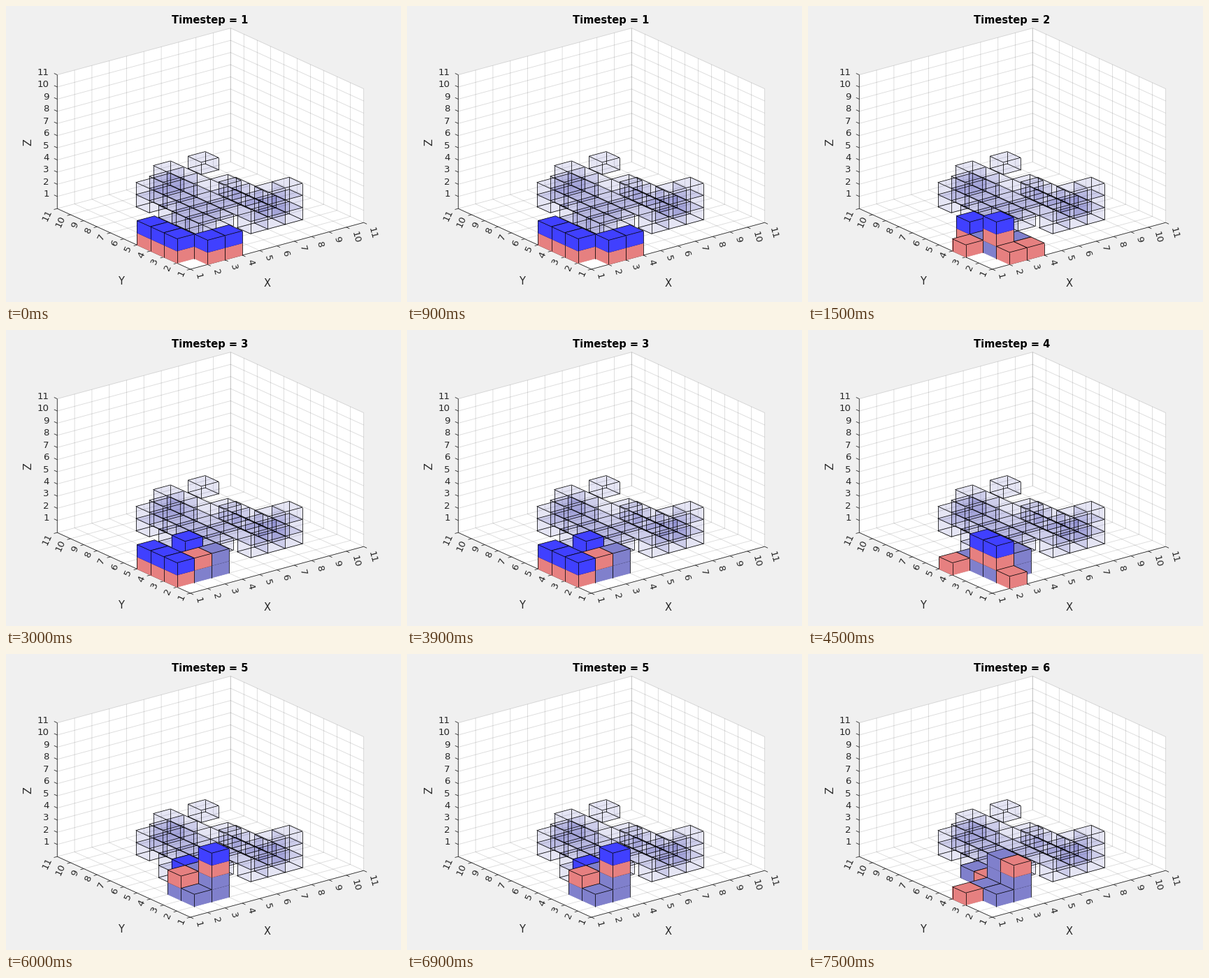
A matplotlib script that plays this animation: 565 px wide and 424 px high, repeating every 8 s.

```python
from itertools import combinations, product

import matplotlib.pyplot as plt
from matplotlib.animation import FuncAnimation
from matplotlib.collections import LineCollection, PolyCollection

W, H, DPI = 565, 424, 96
PX = 72 / DPI
INK = (0.15, 0.15, 0.15)
COLORS = {"p": "#e68080", "g": "#8080cc", "b": "#4040ff"}

# Stacks of modules, bottom to top; "/" parts the x rows, blanks the y cells
STEPS = [
    "- pb pb pb / pb / pb",
    "- - p / p gpb g pb / p g",
    "- pb pb pb / - gp / - gg - gb",
    "- - - p / p gpb gpb g / - gg",
    "- / - g gp / - ggpb gg gb",
    "- - p / - g g / - ggp ggg p g",
]

plt.rcParams["font.family"] = "DejaVu Sans"


def project(x, y, z):
    """Orthographic projection of grid coordinates to stage pixels."""
    return (263.6 + 24.8 * x - 19.03 * y,
            377 - 6.68 * x - 8.68 * y - 17.42 * z)


def box(xs, ys, zs):
    """Cells of a block, each range given as (first, last)."""
    return set(product(*(range(a, b + 1) for a, b in (xs, ys, zs))))


goal = set().union(
    box((2, 2), (2, 4), (0, 1)),
    box((3, 3), (2, 7), (1, 1)),
    box((3, 3), (7, 7), (0, 0)),
    box((4, 4), (3, 7), (1, 1)),
    box((3, 4), (6, 6), (2, 2)),
    box((4, 4), (5, 7), (2, 2)),
    box((6, 6), (7, 7), (2, 2)),
    box((5, 5), (3, 4), (1, 1)),
    box((5, 5), (4, 4), (2, 2)),
    box((5, 7), (2, 2), (0, 1)),
    box((6, 7), (2, 2), (2, 2)),
    box((7, 7), (3, 6), (0, 0)),
)


def face(cell, axis, side):
    """Corners of the cube face across an axis, at its near or far side."""
    pts = []
    for uv in ((0, 0), (1, 0), (1, 1), (0, 1)):
        d = list(uv)
        d.insert(axis, side)
        pts.append(tuple(c + e for c, e in zip(cell, d)))
    return pts


def flat(points):
    return [project(*p) for p in points]


def edges(cell):
    corners = [tuple(c + e for c, e in zip(cell, d))
               for d in product((0, 1), repeat=3)]
    return {(p, q) for p, q in combinations(corners, 2)
            if sum(abs(a - b) for a, b in zip(p, q)) == 1}


def modules(step):
    """Coloured cells of one timestep, far to near."""
    cells = [((x, y, z), COLORS[c])
             for x, part in enumerate(STEPS[step].split("/"))
             for y, stack in enumerate(part.split())
             for z, c in enumerate(stack) if c != "-"]
    return sorted(cells, key=lambda m: (-m[0][0], -m[0][1], m[0][2]))


fig = plt.figure(figsize=(W / DPI, H / DPI), dpi=DPI, facecolor="#f0f0f0")
ax = fig.add_axes([0, 0, 1, 1])
ax.set_xlim(0, W)
ax.set_ylim(H, 0)
ax.axis("off")


def text(x, y, s, px, **kw):
    kw = {"ha": "center", "va": "center", "color": INK, **kw}
    return ax.text(x, y, s, fontsize=px * PX, **kw)


def lines(paths, color, width, zorder):
    ax.add_collection(LineCollection(paths, colors=[color],
                                     linewidths=width * PX, zorder=zorder))


def shift(p, dx, dy):
    return p[0] + dx, p[1] + dy


# White floor and back walls
walls = [[(0, 0, 0), (10, 0, 0), (10, 10, 0), (0, 10, 0)],
         [(0, 10, 0), (10, 10, 0), (10, 10, 11), (0, 10, 11)],
         [(10, 0, 0), (10, 10, 0), (10, 10, 11), (10, 0, 11)]]
ax.add_collection(PolyCollection([flat(w) for w in walls], zorder=0,
                                 facecolors="white", edgecolors="none"))

grid = []
rules = [flat([(0, 10, 11), (0, 10, 0), (0, 0, 0), (10, 0, 0)])]
for k in range(11):
    grid.append(flat([(k, 0, 0), (k, 10, 0), (k, 10, 11)]))
    grid.append(flat([(0, k, 0), (10, k, 0), (10, k, 11)]))
    grid.append(flat([(0, 10, k + 1), (10, 10, k + 1), (10, 0, k + 1)]))

    px, py, pz = project(k, 0, 0), project(0, k, 0), project(0, 10, k + 1)
    rules.append([px, shift(px, 4.5, 2.1)])
    rules.append([py, shift(py, -4.8, 1.3)])
    rules.append([pz, shift(pz, -4.5, -2.1)])

    label = str(k + 1)
    text(*shift(px, 10.8, 6.5), label, 13.33, ha="left", rotation=-75,
         rotation_mode="anchor")
    text(*shift(py, -11, 2), label, 13.33, ha="right", rotation=65,
         rotation_mode="anchor")
    text(*shift(pz, -11.5, -3), label, 13.33, ha="right")

lines(grid, INK + (0.16,), 0.9, 1)
lines(rules, INK, 0.8, 1)

text(374, 397, "X", 14.67)
text(164, 394.5, "Y", 14.67)
text(31.5, 194.5, "Z", 14.67, rotation=90)
title = text(291.5, 25, "", 14.67, weight="bold", color="black", va="baseline")

# Translucent goal shape
shell = [flat(face(c, axis, side)) for c in sorted(goal)
         for axis in range(3) for side in (0, 1)]
ax.add_collection(PolyCollection(shell, facecolors=[(0, 0, 0.6, 0.05)],
                                 edgecolors="none", zorder=3))
wires = sorted(set().union(*map(edges, goal)))
lines([flat(e) for e in wires], "black", 0.75, 4)

solid = PolyCollection([], linewidths=0.75 * PX, zorder=5)
ax.add_collection(solid)


def draw(frame):
    step = frame // 3
    quads, fills, strokes = [], [], []
    for cell, color in modules(step):
        for axis, side in ((0, 0), (1, 0), (2, 1)):
            pts = flat(face(cell, axis, side))
            quads.append(pts)
            fills.append(color)
            strokes.append("black" if axis == 2 else color)
            if axis < 2:
                # side faces carry only their upright edges
                for a, b in ((pts[0], pts[3]), (pts[1], pts[2])):
                    quads.append([a, b])
                    fills.append("none")
                    strokes.append("black")
    solid.set_verts(quads)
    solid.set_facecolor(fills)
    solid.set_edgecolor(strokes)
    title.set_text(f"Timestep = {step + 1}")
    return solid, title


anim = FuncAnimation(fig, draw, frames=16, interval=500,
                     init_func=lambda: draw(0), repeat=True)
plt.show()
```
